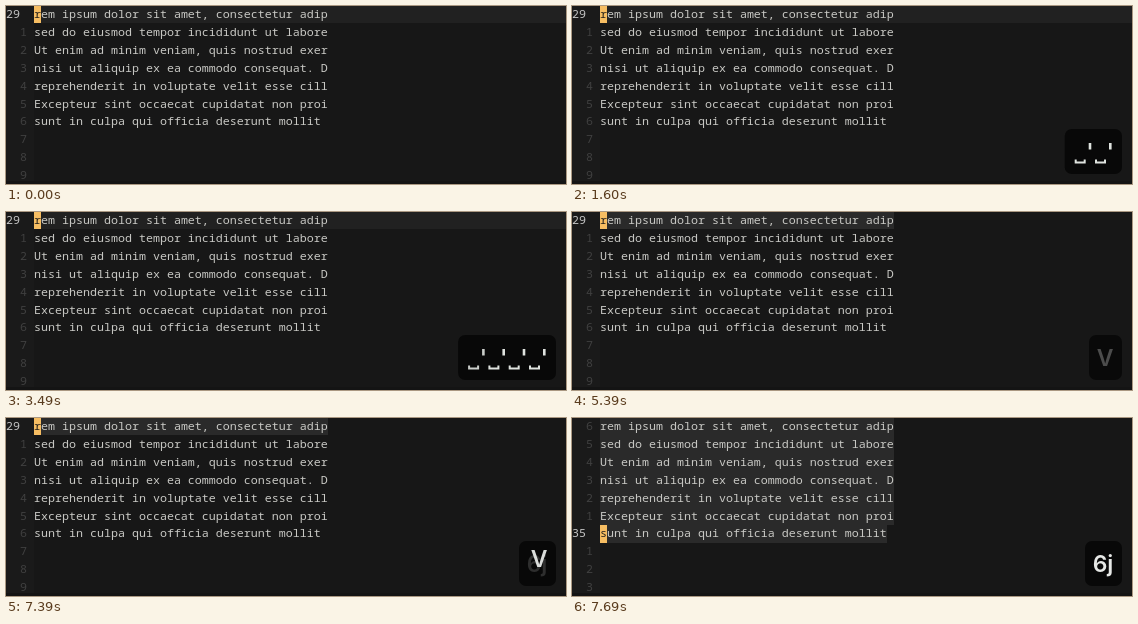
An HTML page that plays this animation: 560x178 px, repeating every 8 s.

```html
<!DOCTYPE html>
<html lang="en">
<head>
<meta charset="utf-8">
<title>Line-wise selection</title>
<style>
  html, body { margin: 0; width: 100%; height: 100%; overflow: hidden; background: #171717; }
  svg { display: block; width: 560px; height: 178px; }
  .code text { font: 11.667px "Noto Sans Mono", "DejaVu Sans Mono", monospace; white-space: pre; fill: #c9c9c5; }
  .code .num { fill: #404040; }
  .code .now { fill: #c4c4c4; }
  .code .under { fill: #2a241c; }
  .keys text { font: 600 23px Inter, Roboto, sans-serif; fill: #e6e8e6; text-anchor: middle; }
</style>
</head>
<body>
<svg viewBox="0 0 560 178"></svg>
<script>
const LOOP = 8000, CELL = 7, ROW = 17.86, LEFT = 28, ROWS = 10;
const LINES = [
  "rem ipsum dolor sit amet, consectetur adip",
  "sed do eiusmod tempor incididunt ut labore",
  "Ut enim ad minim veniam, quis nostrud exer",
  "nisi ut aliquip ex ea commodo consequat. D",
  "reprehenderit in voluptate velit esse cill",
  "Excepteur sint occaecat cupidatat non proi",
  "sunt in culpa qui officia deserunt mollit"
];
const SPACES = [500, 1500, 2900, 3400];
const VISUAL = 5390, SWAP = 7390, JUMP = 7490;

const svg = document.querySelector("svg");
function add(parent, tag, attrs, text) {
  const el = document.createElementNS("http://www.w3.org/2000/svg", tag);
  set(el, attrs);
  if (text !== undefined) el.textContent = text;
  parent.append(el);
  return el;
}
function set(el, attrs) {
  for (const k in attrs) el.setAttribute(k, attrs[k]);
}
const rowTop = row => Math.max(0, Math.round(row * ROW - 0.5));
const baseline = row => 12.2 + row * ROW;
const band = (parent, row, x, width, fill) =>
  add(parent, "rect", { x, y: rowTop(row), width, height: rowTop(row + 1) - rowTop(row), fill });

// Editor, one group for each of its three states
function editor(cursor, visual) {
  const g = add(svg, "g", { class: "code" });
  add(g, "rect", { width: 560, height: 178, fill: "#171717" });
  add(g, "rect", { width: LEFT, height: 175, fill: "#1a1a1a" });
  add(g, "rect", { y: 175, width: 560, height: 3, fill: "#141414" });
  if (!visual) band(g, cursor, LEFT, 560 - LEFT, "#212121");
  for (let i = 0; i < ROWS; i++) {
    const line = LINES[i] || "", here = i === cursor;
    if (visual && i <= cursor) band(g, i, LEFT, line.length * CELL, "#2a2a2a");
    if (here) band(g, i, LEFT, CELL, "#f6bd62");
    add(g, "text", { x: here ? 0 : 2 * CELL, y: baseline(i), class: here ? "now" : "num" },
      here ? 29 + i : Math.abs(i - cursor));
    if (here) add(g, "text", { x: LEFT, y: baseline(i), class: "under" }, line[0]);
    add(g, "text", { x: LEFT + (here ? CELL : 0), y: baseline(i) }, here ? line.slice(1) : line);
  }
  return g;
}
const [normal, single, block] = [[0, false], [0, true], [6, true]].map(a => editor(...a));

// Key display
const keys = add(svg, "g", { class: "keys" });
const box = add(keys, "rect", { y: 123, height: 45, rx: 7, fill: "#080808" });
const PITCH = 20.3;
const marks = SPACES.map((_, i) => {
  const g = add(keys, "g", { transform: `translate(${523 - i * PITCH} 0)` });
  add(g, "path", { d: "M1 153.5V156.5H10V153.5", fill: "none", stroke: "#dfe3df", "stroke-width": 2 });
  add(g, "rect", { x: 14, y: 137, width: 2.6, height: 6.5, fill: "#dfe3df" });
  return g;
});
const next = add(keys, "text", { x: 531, y: 153.5 }, "6j");
const letter = add(keys, "text", { x: 533, y: 153.5 }, "V");

// Value of the list for the 100 ms step that t has reached after start
const step = (t, start, list) =>
  t < start ? 0 : list[Math.min(list.length - 1, Math.floor((t - start) / 100))];

function draw(t) {
  const visual = t >= VISUAL, swap = t >= SWAP;
  const show = (el, on) => set(el, { visibility: on ? "visible" : "hidden" });
  show(normal, !visual);
  show(single, visual && t < JUMP);
  show(block, t >= JUMP);

  const count = SPACES.filter(s => t >= s).length;
  const left = visual ? step(t, VISUAL, [517, 514, 513]) : 550.3 - 17 - PITCH * count;
  set(box, {
    x: left, width: 550 - left,
    opacity: visual ? step(t, VISUAL, [0.85, 0.95, 1]) : step(t, SPACES[0], [0.4, 0.8, 1])
  });
  marks.forEach((m, i) => set(m, {
    opacity: visual ? 0 : step(t, SPACES[i], i ? [0.9, 1] : [0.4, 0.8, 1])
  }));
  set(letter, {
    y: 153.5 - step(t, SWAP, [4.5, 9, 13, 15]),
    opacity: swap ? step(t, SWAP, [0.95, 0.4, 0.1, 0]) : step(t, VISUAL, [0.3, 0.8, 1])
  });
  set(next, { opacity: step(t, SWAP, [0.17, 0.65, 0.92, 1]) });
}

const begin = performance.now();
function tick() {
  draw((performance.now() - begin) % LOOP);
  requestAnimationFrame(tick);
}
tick();
</script>
</body>
</html>
```
